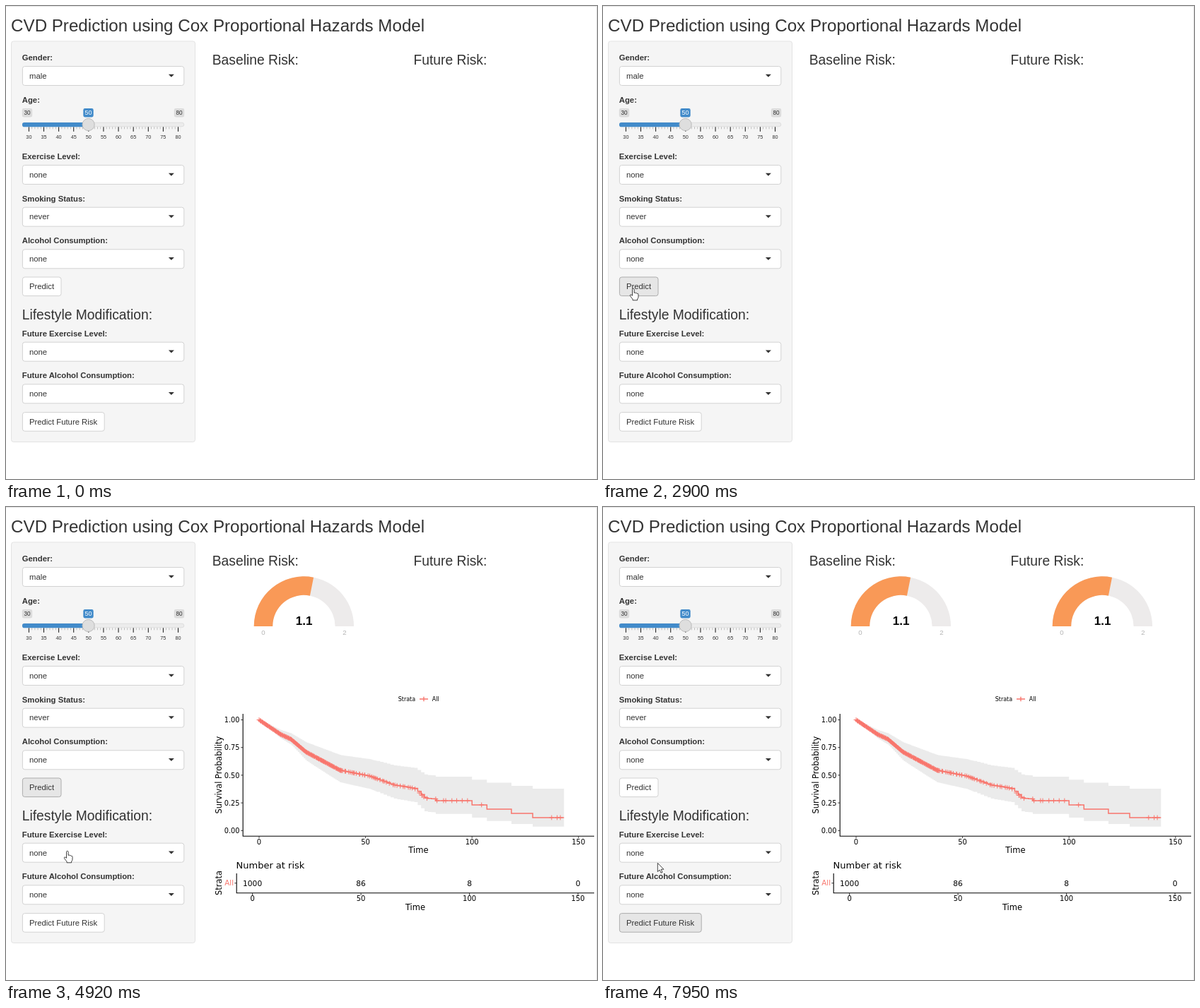
Write an HTML page that moves like this. It is 836 by 670 pixels and loops after 8000 ms.

```html
<!DOCTYPE html>
<html lang="en">
<head>
<meta charset="utf-8">
<title>CVD Prediction</title>
<style>
html, body { margin: 0; width: 100%; height: 100%; overflow: hidden; background: #fff; }
svg { display: block; width: 836px; height: 670px; }
text { font-family: "Liberation Sans", Arial, sans-serif; fill: #333; }
.plot text { font-family: "DejaVu Sans", sans-serif; fill: #000; }
</style>
</head>
<body>
<svg id="stage" viewBox="0 0 836 670"></svg>
<script>
const LOOP = 8000;
const PLOT_AT = 3500, FUTURE_AT = 7150;
const CORAL = "#f8766d";
const stage = document.getElementById("stage");

function add(parent, tag, attrs, content) {
  const el = document.createElementNS("http://www.w3.org/2000/svg", tag);
  for (const k in attrs) el.setAttribute(k, attrs[k]);
  if (content !== undefined) el.textContent = content;
  parent.appendChild(el);
  return el;
}
const group = attrs => add(stage, "g", attrs || {});
const label = (p, x, y, size, str, more) =>
  add(p, "text", { x, y, "font-size": size, ...more }, str);
const mid = { "text-anchor": "middle" };
const end = { "text-anchor": "end" };
const bold = { "font-weight": "bold" };
const box = (p, x, y, width, height, rx, fill, stroke) =>
  add(p, "rect", { x, y, width, height, rx, fill, stroke: stroke || "none" });
const line = (p, d, stroke, width) =>
  add(p, "path", { d, fill: "none", stroke, "stroke-width": width });
const clamp = v => Math.min(1, Math.max(0, v));
const mix = (a, b, k) => a + (b - a) * k;

// Page and sidebar
const page = group();
line(page, "M0 .5H836", "#e4e4e4", 1);
line(page, "M835.5 0V670", "#e8e8e8", 1);
label(page, 7.1, 36, 24.15, "CVD Prediction using Cox Proportional Hazards Model");
box(page, 7.5, 49.9, 260, 567.6, 3.2, "#f5f5f5", "#e3e3e3");
label(page, 291.7, 82.5, 19.3, "Baseline Risk:");
label(page, 576.4, 82.5, 19.3, "Future Risk:");
label(page, 22.7, 444, 19.3, "Lifestyle Modification:");

const ROW = 59.65;
const selects = [
  ["Gender:", "male", 85.5],
  ["Exercise Level:", "none", 225.5],
  ["Smoking Status:", "never", 225.5 + ROW],
  ["Alcohol Consumption:", "none", 225.5 + ROW * 2],
  ["Future Exercise Level:", "none", 476.2],
  ["Future Alcohol Consumption:", "none", 476.2 + ROW]
];
for (const [name, value, y] of selects) {
  label(page, 22.8, y - 8.6, 11.3, name, bold);
  box(page, 23.4, y, 228.4, 27, 3.2, "#fff", "#d2d2d2");
  label(page, 33, y + 17.3, 11.3, value);
  add(page, "path", { d: `M229.9 ${y + 11.2}h8l-4 4z`, fill: "#333" });
}

// Age slider
label(page, 22.8, 136.6, 11.3, "Age:", bold);
function badge(x, str, size, fill, color) {
  box(page, x - 7.2, 145, 14.4, 12.5, 2.4, fill);
  label(page, x, 154.3, size, str, { ...mid, style: "fill:" + color });
}
badge(30, "30", 8.2, "#dcdcdc", "#333");
badge(245, "80", 8.2, "#dcdcdc", "#333");
badge(116.5, "50", 9, "#428bca", "#fff");
for (let i = 0; i <= 50; i++) {
  const x = 32.4 + i * 4.222, big = i % 5 === 0;
  line(page, `M${x} 171V${big ? 177.8 : 174.3}`, big ? "#111" : "#999", big ? 1 : 0.6);
  if (big) label(page, x, 188, 7.3, 30 + i, mid);
}
box(page, 23.3, 165.2, 228.5, 5.6, 2.8, "#ececec", "#dfdfdf");
box(page, 23, 165, 94, 6.2, 2.8, "#428bca");
add(page, "circle", { cx: 116.6, cy: 168, r: 8.6, fill: "#dedede", stroke: "#bbb" });

// Buttons
function button(y, w, str) {
  const rect = box(page, 23.4, y, w, 26.6, 3.2, "#fff", "#d2d2d2");
  label(page, 33, y + 17.2, 11.3, str);
  return {
    hit: (x, py) => x >= 23 && x <= 23 + w && py >= y && py <= y + 26.6,
    paint(lit, active) {
      rect.setAttribute("fill", active ? "#d4d4d4" : lit ? "#e6e6e6" : "#fff");
      rect.setAttribute("stroke", active ? "#8c8c8c" : lit ? "#adadad" : "#d2d2d2");
    }
  };
}
const predict = button(384, 54.6, "Predict");
const future = button(575.6, 115.8, "Predict Future Risk");

// Gauges
function arc(cx, part) {
  const a = Math.PI * (1 - part), c = Math.cos(a), s = Math.sin(a);
  const cy = 169, R = 70.7, r = 44.2;
  return `M${cx - r} ${cy}H${cx - R}A${R} ${R} 0 0 1 ${cx + R * c} ${cy - R * s}` +
    `L${cx + r * c} ${cy - r * s}A${r} ${r} 0 0 0 ${cx - r} ${cy}Z`;
}
function gauge(cx, start) {
  const g = group(), grey = { ...mid, style: "fill:#b3b3b3" };
  add(g, "path", { d: arc(cx, 1), fill: "#edebeb" });
  const level = add(g, "path", { fill: "#f99957" });
  const value = label(g, cx + 0.3, 167.3, 17.1, "1.1", { ...mid, ...bold, style: "fill:#010101" });
  label(g, cx - 57.5, 181, 9.7, "0", grey);
  label(g, cx + 57.5, 181, 9.7, "2", grey);
  return t => {
    g.style.display = t < start ? "none" : "";
    const k = Math.pow(clamp((t - start) / 700), 0.48);
    level.setAttribute("d", arc(cx, 0.562 * k));
    value.setAttribute("fill-opacity", k);
  };
}
const gauges = [gauge(421.4, PLOT_AT), gauge(706.4, FUTURE_AT)];

// Survival plot
const plot = group({ class: "plot" });
const px = time => 358 + time * 3.012;
const py = s => 458.3 - s * 156.8;

// Key points of the early curve, then the times of the late, even drops
const early = [[0, 1], [10, 0.87], [15, 0.825], [22, 0.71], [38, 0.545], [52, 0.492], [63, 0.413], [73, 0.381], [78, 0.292], [83, 0.285]];
const drops = [83, 100, 107, 118.5, 128.5];
const LAST = 143.2;

function survival(time) {
  const late = drops.filter(d => time >= d).length;
  if (late) return 0.27 - 0.0383 * (late - 1);
  const i = early.findIndex(p => p[0] > time);
  const [a, b] = [early[i - 1], early[i]];
  return mix(a[1], b[1], (time - a[0]) / (b[0] - a[0]));
}
// Confidence limits widen with the cumulative hazard
function limit(side) {
  return time => {
    const s = survival(time), h = -Math.log(s);
    return s * Math.exp(side * (0.3 * h + 0.115 * h * h));
  };
}
function stairs(fn) {
  const times = [];
  for (let t = 0; t < drops[0]; t += t < 55 ? 0.7 : 1.6) times.push(t);
  times.push(...drops);
  const pts = [];
  times.forEach((t, i) => {
    const y = py(fn(t));
    pts.push([px(t), y], [px(i + 1 < times.length ? times[i + 1] : LAST), y]);
  });
  return pts;
}
const toPath = pts => "M" + pts.map(p => p.join(" ")).join("L");
const band = stairs(limit(1)).concat(stairs(limit(-1)).reverse());
add(plot, "path", { d: toPath(band) + "Z", fill: "#ebebeb" });
line(plot, toPath(stairs(survival)), CORAL, 1.5);

// Censoring marks thin out over time
let seed = 7;
const random = () => (seed = seed * 16807 % 2147483647) / 2147483647;
function censor(n, from, to) {
  let d = "";
  for (let i = 0; i < n; i++) {
    const t = mix(from, to, (i + random()) / n);
    d += `M${px(t) - 3.4} ${py(survival(t))}h6.8m-3.4 -3.4v6.8`;
  }
  line(plot, d, CORAL, 1);
}
censor(130, 0, 39);
censor(22, 39, 57);
censor(18, 57, 79);
censor(8, 81, 98);
censor(1, 104, 105);
censor(3, 137, LAST);

line(plot, "M585 272H597M591 268.7v6.6", CORAL, 1.4);
label(plot, 554.7, 275, 8, "Strata");
label(plot, 602.7, 275, 8, "All");

line(plot, "M335.2 293V466.2H832", "#000", 1.1);
line(plot, "M326.2 519V546.8H832", "#000", 1.1);
for (let s = 0; s <= 1; s += 0.25) {
  line(plot, `M332.3 ${py(s)}h3`, "#333", 1);
  label(plot, 330.6, py(s) + 3.6, 9.8, s.toFixed(2), end);
}
["1000", "86", "8", "0"].forEach((n, i) => {
  const x = px(i * 50), x2 = 348.6 + i * 153.5;
  line(plot, `M${x} 466v3M${x2} 547v3`, "#333", 1);
  label(plot, x, 478, 10, i * 50, mid);
  label(plot, x2, 558.4, 10, i * 50, mid);
  label(plot, x2, 537, 10.7, n, mid);
});
const upright = (y, str) =>
  label(plot, 0, 0, 11.4, str, { ...mid, transform: `translate(304.8 ${y}) rotate(-90)` });
upright(379.6, "Survival Probability");
upright(532.5, "Strata");
label(plot, 583.4, 490, 11.5, "Time", mid);
label(plot, 579, 571, 11.5, "Time", mid);
label(plot, 325.5, 511.6, 13, "Number at risk");
label(plot, 322, 536, 10.3, "All", { ...end, style: "fill:" + CORAL });
line(plot, "M323.3 532.8h3", "#333", 1);

// Pointer
const pointer = group();
const shape = d =>
  add(pointer, "path", { d, fill: "#fff", stroke: "#222", "stroke-width": 0.85, "stroke-linejoin": "round" });
const shapes = {
  arrow: shape("M.3 .4V12.6L3.1 10 5 14.3 7 13.4 5.1 9.2H8.9Z"),
  hand: shape("M-1.5 10.2V1.6Q-1.5 .3 -.2 .3T1.1 1.6V6.4Q2.3 5.1 3.2 6.8 4.6 5.8 5.2 7.4 7 6.8 7 8.6V12" +
    "Q7 14 5.6 15V16.8H-1V15.2Q-2.6 13.6 -4.6 10.4 -5 8.8 -3.4 9Z"),
  resize: shape("M0 -9.3L4 -5.2H1.1V5.2H4L0 9.3 -4 5.2H-1.1V-5.2H-4Z")
};
// Stops of the pointer: arrival time, x, y, and departure time where it rests
const stops = [
  [160, 646, 660], [400, -14, 276, 640], [930, 158, 196], [1120, 89, 170.3],
  [1420, 90, 102.5, 2090], [2850, 43, 400, 3300], [4310, 87, 409],
  [4920, 87, 487, 6160], [6640, 52, 583, 7070], [7700, 60, 579], [7950, 77, 504]
];
function place(t) {
  const i = stops.findIndex(s => s[0] > t);
  if (i === 0) return stops[0].slice(1);
  if (i < 0) return stops[stops.length - 1].slice(1);
  const [at, x, y, leave = at] = stops[i - 1], next = stops[i];
  const k = clamp((t - leave) / (next[0] - leave));
  return [mix(x, next[1], k), mix(y, next[2], k)];
}
const overSelect = (x, y) => x >= 23 && x <= 252 && selects.some(s => y >= s[2] && y <= s[2] + 27);

function draw(t) {
  const [x, y] = place(t);
  const onPredict = predict.hit(x, y), onFuture = future.hit(x, y);
  const press = 3060, press2 = 6930;
  predict.paint(onPredict || t >= press && t < press2, t >= press && t < press + 90);
  future.paint(onFuture || t >= press2, t >= press2 && t < press2 + 90);

  let kind = "arrow";
  if (onPredict || onFuture || overSelect(x, y)) kind = "hand";
  else if (x > 23 && x < 252 && y > 159 && y < 178) kind = "resize";
  for (const k in shapes) shapes[k].style.display = k === kind ? "" : "none";
  pointer.style.display = t < 160 ? "none" : "";
  pointer.setAttribute("transform", `translate(${x} ${y})`);

  plot.style.display = t < PLOT_AT ? "none" : "";
  gauges.forEach(g => g(t));
}

let start;
function tick(now) {
  if (start === undefined) start = now;
  draw((now - start) % LOOP);
  requestAnimationFrame(tick);
}
draw(0);
requestAnimationFrame(tick);
</script>
</body>
</html>
```
